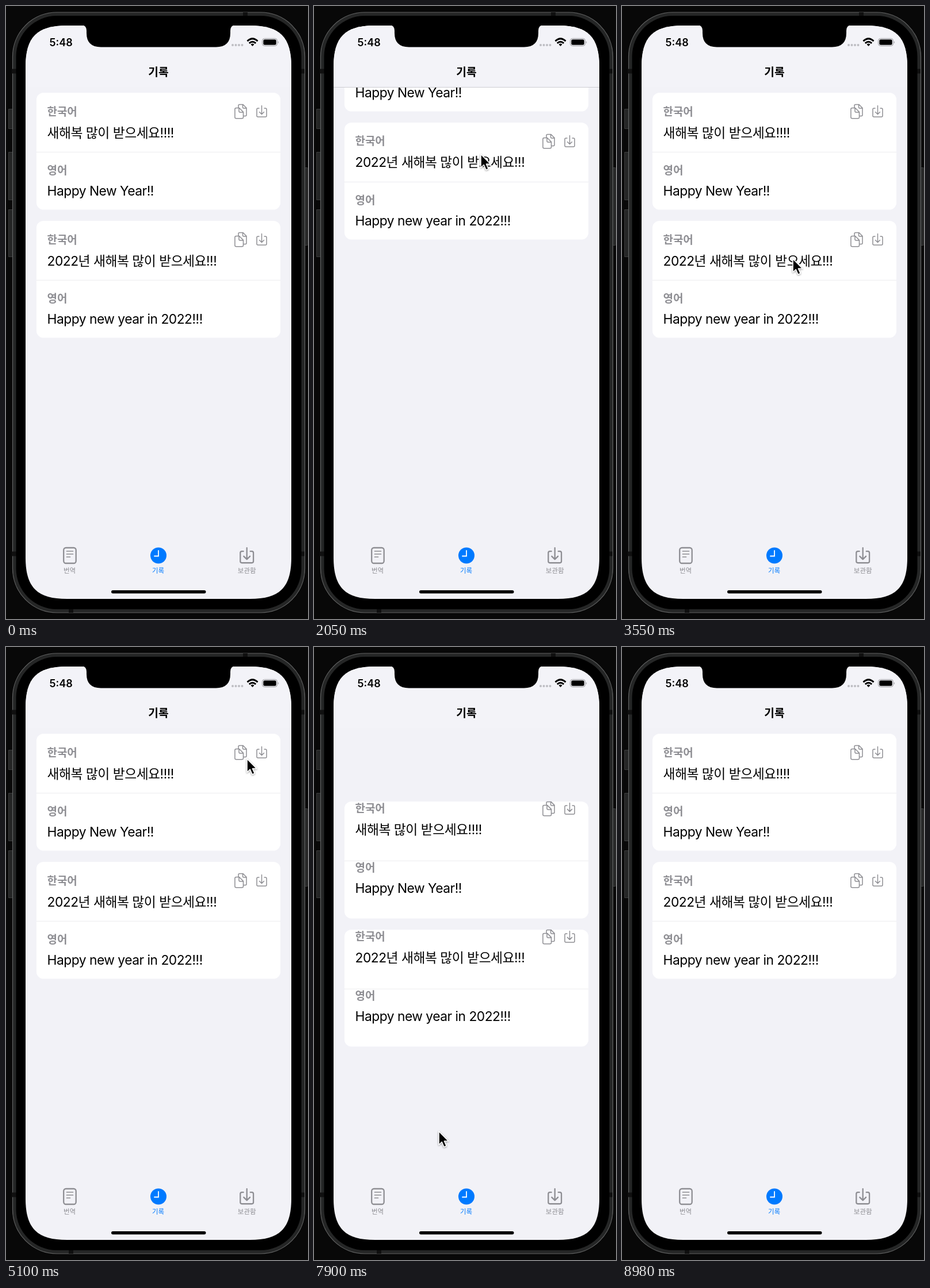
Recreate the animation shown at these times as an HTML page. Size 525 by 1067 pixels, loop 9070 ms.

```html
<!DOCTYPE html>
<html lang="ko">
<head>
<meta charset="utf-8">
<title>기록</title>
<style>
  html, body { margin: 0; width: 100%; height: 100%; overflow: hidden; background: #080808; }
  svg { display: block; width: 525px; height: 1067px; }
  text { font-family: Inter, "Noto Sans CJK KR", "Noto Sans CJK", sans-serif; }
  .label { font-size: 19px; font-weight: 600; fill: #8e8e93; letter-spacing: -.1px; }
  .body { font-size: 22.8px; letter-spacing: -.5px; }
  .title { font-size: 19.2px; font-weight: 600; text-anchor: middle; }
  .tab { font-size: 11.5px; fill: #8e8e93; text-anchor: middle; }
  .tab.active { fill: #007aff; }
  .clock { font-size: 18px; font-weight: 600; }
  .icon { fill: none; stroke: #8e8e93; stroke-linecap: round; stroke-linejoin: round; }
</style>
</head>
<body>
<svg viewBox="0 0 525 1067">
  <defs>
    <clipPath id="screen">
      <path d="M34 106 C34 54 54 34 106 34 H424 C476 34 496 54 496 106 V960 C496 1012 476 1032 424 1032 H106 C54 1032 34 1012 34 960z"/>
    </clipPath>
    <path id="save" d="M-4.5 -5.5 h-2 q-2 0 -2 2 v11 q0 2 2 2 h13 q2 0 2 -2 v-11 q0 -2 -2 -2 h-2 M0 -10 v15 M-4 1 l4 4 4 -4"/>
    <path id="copy" d="M404 177 v-3.5 q0 -2 2 -2 h6 l6 6 v12 q0 2 -2 2 h-3 M411.5 171.5 v4.5 q0 2 2 2 h4.5
      M400 177.5 h5.5 l7 7 v9 q0 2.3 -2.3 2.3 h-10 q-2.3 0 -2.3 -2.3 v-13.7 q0 -2.3 2.1 -2.3 M405 178 v5 q0 2 2 2 h5"/>
  </defs>

  <!-- Phone body: side buttons, metal band with antenna gaps, black bezel -->
  <path d="M4.5 179.5h9v34h-9z M4.500 254.500h9v83h-9z M4.500 354.500h9v82h-9z M516 281.500h8v135h-8z" fill="#242525" stroke="#3c3d3d"/>
  <rect x="11.5" y="11" width="508" height="1045" rx="77" fill="#252626" stroke="#626363" stroke-width="1.2"/>
  <path d="M11 113.5h8 m492 0h8 M11 953.5h8 m492 0h8 M416 11v7 M113 1049v7" stroke="#101010" stroke-width="8"/>
  <rect x="17.5" y="17" width="496" height="1033" rx="71"/>

  <g clip-path="url(#screen)">
    <rect x="34" y="34" width="462" height="998" fill="#f2f2f7"/>
    <g id="backs"></g>
    <g id="words"></g>

    <rect x="34" y="34" width="462" height="107" fill="#f3f3f8"/>
    <path id="hairline" d="M34 141.5H496" stroke="#cdcdd2"/>
    <text class="title" x="265" y="122">기록</text>

    <text class="clock" x="75.5" y="70">5:48</text>
    <path d="M394 68h17" stroke="#bdbdc2" stroke-width="4" stroke-linecap="round" stroke-dasharray="0 5.5"/>
    <path d="M419.5 61.2 q9 -8.5 18 0 M422.8 64.8 q5.7 -5.2 11.4 0" fill="none" stroke="#000" stroke-width="3"/>
    <path d="M425.5 66.8 q3 -2.5 6 0 l-3 3.2z"/>
    <rect x="445.5" y="56.5" width="26" height="13" rx="4" fill="none" stroke="#98989c"/>
    <rect x="447.3" y="58.3" width="22.4" height="9.4" rx="2.5"/>
    <path d="M473 61 q2 2 0 4.5z" fill="#98989c"/>

    <g class="icon" stroke-width="2.3">
      <rect x="100.2" y="943" width="21.5" height="27" rx="4"/>
      <path d="M105.5 949h11 m-11 5h11 m-11 5h6" stroke-width="1.7"/>
      <use href="#save" transform="translate(418.7 956.5) scale(1.34)" stroke-width="1.72"/>
    </g>
    <circle cx="265" cy="956.5" r="14" fill="#007aff"/>
    <path d="M265 948v9.5h-7" fill="none" stroke="#fff" stroke-width="1.8" stroke-linecap="round"/>
    <text class="tab" x="110.5" y="987">번역</text>
    <text class="tab active" x="264.5" y="987">기록</text>
    <text class="tab" x="418.7" y="987">보관함</text>
    <rect x="183" y="1017" width="164.5" height="5.5" rx="2.75"/>
  </g>
  <path d="M132 33 q8 1 8 10 v4 q0 24.5 25 24.5 h200 q25 0 25 -24.5 v-4 q0 -9 8 -10z"/>

  <g id="cursor" style="filter:drop-shadow(0 1.5px 1.5px #0006)">
    <path d="M0 0 v23.5 l5.2 -5 3.8 8.7 4.2 -1.8 -3.7 -8.4 h7.3z" stroke="#fff" stroke-width="1.6" stroke-linejoin="round"/>
  </g>
</svg>

<script>
const LOOP = 9070, STEP = 50, CARD_GAP = 223, SPRING = 0.0109;
const [backs, words, hairline, cursor] =
  ["backs", "words", "hairline", "cursor"].map(id => document.getElementById(id));
const smooth = x => { x = Math.min(1, Math.max(0, x)); return x * x * (3 - 2 * x); };
const mix = (a, b, k) => a + (b - a) * k;
const move = (node, x, y) => node.setAttribute("transform", `translate(${x} ${y})`);
const show = (node, on) => { node.style.display = on ? "" : "none"; };

const cards = [
  ["새해복 많이 받으세요!!!!", "Happy New Year!!"],
  ["2022년 새해복 많이 받으세요!!!", "Happy new year in 2022!!!"]
];
const stack = template => cards.map((card, i) =>
  `<g transform="translate(0 ${i * CARD_GAP})">${template(card)}</g>`).join("");

backs.innerHTML = stack(() => `
  <rect x="53" y="151" width="424" height="203.5" rx="12" fill="#fff"/>
  <path d="M53 254.3H477" stroke="#ececef"/>`);

words.innerHTML = stack(([korean, english]) => `
  <text class="label" x="71.5" y="190.5">한국어</text>
  <text class="body" x="71.5" y="228.5">${korean}</text>
  <text class="label" x="71.5" y="293">영어</text>
  <text class="body" x="71.5" y="330">${english}</text>
  <g class="icon" stroke-width="1.5">
    <use href="#copy"/>
    <use href="#save" transform="translate(444.5 183.5)"/>
  </g>`);

// Rubber-band drags: the list stretches, holds briefly, then springs back
const pulls = [
  { start: 50, release: 430, distance: 170 },
  { start: 1650, release: 2193, distance: -185 },
  { start: 7350, release: 7826, distance: 121.4 }
];
const pullAt = t => pulls.findLast(p => p.start <= t);

function scrollAt(t) {
  const pull = pullAt(t);
  if (!pull) return 0;
  const { start, release, distance } = pull;
  if (t < release) return distance * smooth((t - start) / (release - start) / 0.886);
  const u = (t - release) * SPRING;
  const y = distance * (1 + u) * Math.exp(-u);
  return Math.abs(y) < 0.5 ? 0 : y;
}

// Cursor stops: time, x, y; eased in between
const stops = [
  [50, 288, 350], [400, 288, 734], [1650, 290, 734], [2050, 290, 258],
  [2450, 290, 175], [3550, 297, 440], [4400, 408, 404], [4600, 400, 186],
  [5700, 444, 206], [6400, 443, 186], [6650, 249, 872], [7350, 213, 600],
  [7750, 217, 843], [8550, 217, 843]
];

function cursorAt(t) {
  const next = stops.findIndex(([time]) => time > t);
  if (next < 1) return null;
  const [t0, x0, y0] = stops[next - 1], [t1, x1, y1] = stops[next];
  const k = smooth((t - t0) / (t1 - t0));
  return [mix(x0, x1, k), mix(y0, y1, k)];
}

function draw(now) {
  const t = Math.floor(now % LOOP / STEP) * STEP;
  const scroll = scrollAt(t), pull = pullAt(t);
  // Card backs trail their text by one step while springing up
  const springingUp = pull && pull.distance > 0 && t > pull.release;
  move(words, 0, scroll);
  move(backs, 0, springingUp ? scrollAt(t - STEP) : scroll);
  show(hairline, scroll < 0);

  const pos = cursorAt(t);
  show(cursor, pos);
  if (pos) move(cursor, ...pos);
  requestAnimationFrame(draw);
}
draw(0);
</script>
</body>
</html>
```
